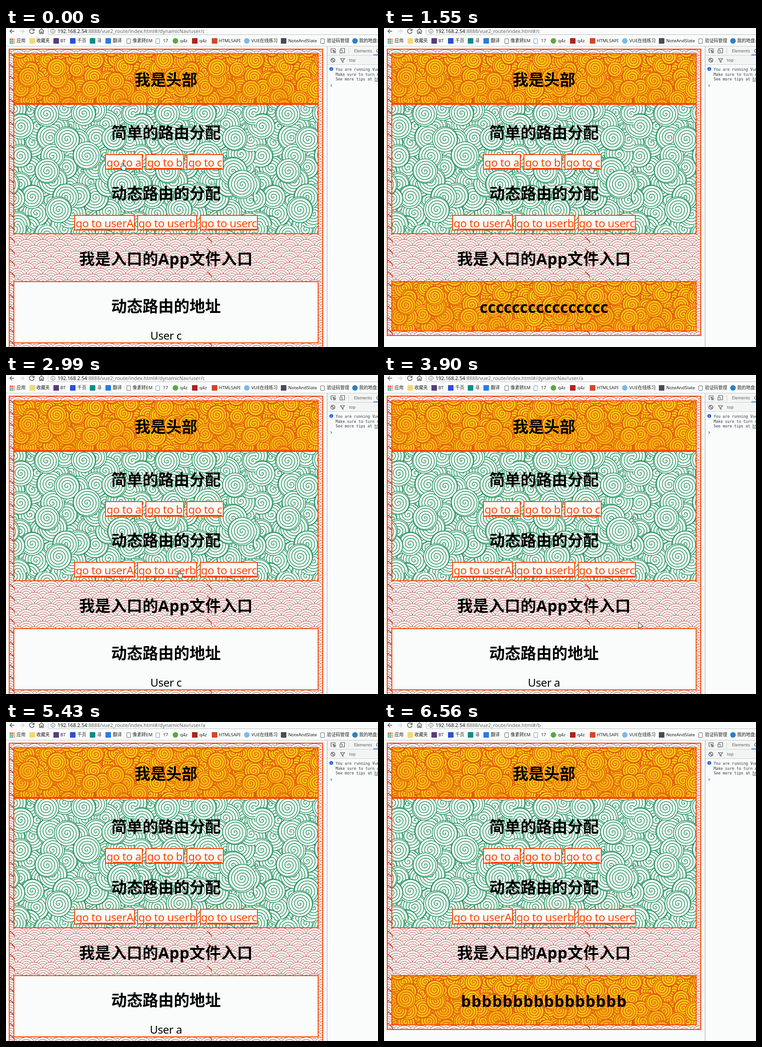
These frames come from a looping animation (808 px wide and 693 px high, 7.15 s). An HTML page with a canvas:

```html
<!DOCTYPE html>
<html lang="zh-CN">
<head>
<meta charset="utf-8">
<title>Vue router demo</title>
<style>
  html, body { margin: 0; width: 100%; height: 100%; overflow: hidden; background: #f9fcfb; }
  #stage { position: relative; width: 808px; height: 693px; overflow: hidden; background: #f9fcfb;
    font-family: "Noto Sans", "Noto Sans CJK SC", "Noto Sans CJK", sans-serif; color: #000; }
  #stage div, #stage span, #stage svg, canvas { position: absolute; box-sizing: border-box; }
  #stage span { white-space: pre; line-height: 20px; }
  .box { border: 2px solid #ff4500; overflow: hidden; }
  .box canvas { left: 0; top: 0; }
  #app { left: 6px; top: 45px; width: 683px; }
  #head { left: 16px; top: 55px; width: 663px; height: 110px; }
  #nav { left: 16px; top: 165px; width: 663px; height: 283px; }
  #view { left: 16px; top: 550px; width: 663px; background: #fafcfc; }
  #stage .title { left: 7px; width: 681px; height: 40px; font: bold 34px/40px "Noto Sans", "Noto Sans CJK SC", "Noto Sans CJK", sans-serif; text-align: center; }
  #user { left: 7px; width: 681px; top: 652px; height: 32px; font-size: 24px; line-height: 32px; letter-spacing: -.4px; text-align: center; }
  .link { border: 2px solid #ff4500; background: #fafcfc; height: 34px; color: #ff4500;
    font-size: 24px; line-height: 31px; letter-spacing: -.4px; text-align: center; white-space: pre;
    text-decoration: underline; text-decoration-thickness: 2px; text-underline-offset: 3px; }
  .mark { font-size: 9.7px; color: #222; top: 18px; }
  #url { left: 112px; top: -3px; font-size: 10.8px; color: #666; }
  #url b { font-weight: normal; color: #111; }
  #tools { left: 697px; top: 40px; width: 111px; height: 653px; border-left: 1px solid #aaa; }
  .bar { left: 0; width: 111px; height: 20px; background: #f3f5f4; border-bottom: 1px solid #d0d2d1; }
  .ui { font-size: 9px; color: #5a5a5a; }
  .log { left: 18px; font: 8.25px/20px "DejaVu Sans Mono", "Noto Sans Mono", monospace; color: #303942; }
</style>
</head>
<body>
<div id="stage">
  <svg width="808" height="40" fill="none" stroke="#5a5a5a" stroke-width="1.5">
    <path d="M18 7H9M13 2.500L8.500 7l4.500 4.500"/>
    <path d="M30 7h9M35 2.500L39.500 7L35 11.500" stroke="#d2d4d3"/>
    <path d="M60.500 4.500A5 5 0 1 0 61 8M61 1.500V5.500H57"/>
    <path d="M71.500 7L77 1.500L82.500 7M73 6.500V12h2.800V8.500h2.400V12H81V6.500"/>
    <path d="M91.500 0V12Q91.500 14.500 94 14.500H808" stroke="#bfc1c0" stroke-width="1"/>
    <circle cx="102" cy="7" r="4.500" stroke-width="1"/><path d="M102 6.300V9.500M102 4.200V5.300" stroke-width="1.200"/>
    <path d="M0 39.500H808" stroke="#c6c8c7" stroke-width="1"/>
  </svg>
  <span id="url"></span>
  <div id="app" class="box"></div>
  <div id="head" class="box"></div>
  <div id="nav" class="box"></div>
  <div id="view" class="box"></div>
  <div class="title" style="top:92px">我是头部</div>
  <div class="title" style="top:207px">简单的路由分配</div>
  <div class="title" style="top:339px">动态路由的分配</div>
  <div class="title" style="top:481px;letter-spacing:.4px">我是入口的App文件入口</div>
  <div class="title" id="page"></div>
  <div id="user"></div>

  <div id="tools">
    <div class="bar" style="top:0"></div>
    <div class="bar" style="top:20px"></div>
    <svg width="111" height="100" fill="none" stroke="#5a5a5a" stroke-width="1.200">
      <path d="M11 13H8V5h9v3M12 8l6 2.500l-2.600 1l-1 2.700zM15.500 11.500l3 3"/>
      <path d="M29 7V4.500h8.500V14H33M27.500 8h4.500v6.500h-4.500z"/>
      <path d="M46.500 4V16" stroke="#ccc" stroke-width="1"/>
      <path d="M100 18.500H111" stroke="#3b79e8" stroke-width="2"/>
      <circle cx="12" cy="30" r="4.300" stroke-width="1.500"/><path d="M9 27l6 6" stroke-width="1.500"/>
      <path d="M28.500 26.500h9l-3.400 4v4l-2.200-1.500v-2.500z"/>
      <circle cx="8.500" cy="49" r="4" fill="#1a56d6" stroke="none"/>
      <path d="M8.500 48.500V51.500M8.500 46.300V47.400" stroke="#fff"/>
      <path d="M7 82.500l2.500 2.500L7 87.500" stroke="#3b79e8"/>
    </svg>
    <span class="ui" style="left:58px;top:0">Elements</span>
    <span class="ui" style="left:106px;top:0;color:#222">Console</span>
    <span class="ui" style="left:47px;top:20px">top</span>
    <span class="log" style="top:40px">You are running Vue in development mode.</span>
    <span class="log" style="top:50.500px">Make sure to turn on production mode.</span>
    <span class="log" style="top:61px">See more tips at <u>https://vuejs.org/guide</u></span>
  </div>

  <svg id="arrow" width="13" height="19" viewBox="-1 -1 13 19"><path d="M0 0V13.500L3.200 10.600L5.300 15.500L7.300 14.600L5.200 9.800H9.500Z" fill="#fff" stroke="#222" stroke-width=".9"/></svg>
  <svg id="hand" width="15" height="19" viewBox="-6 -1 15 19"><path d="M-1.300 1.300Q0-.8 1.300 1.300V6Q2.700 5.200 3.700 6.500Q5.200 5.800 6 7.200Q7.700 7 7.700 9V12L6.300 15V17H-1V15L-4.600 10.500Q-5 8.300-3 8.800L-1.300 10.500ZM1.300 6V9M3.700 6.500V9.500M6 7.200V9.500" fill="#fff" stroke="#222" stroke-width=".9"/></svg>
  <svg id="beam" width="9" height="17" viewBox="-4.500 -8.500 9 17"><path d="M-3-7.500H-1L0-6.500L1-7.500H3M-3 7.500H-1L0 6.500L1 7.500H3M0-6.500V6.500" fill="none" stroke="#333"/></svg>
</div>
<script>
const $ = id => document.getElementById(id);
const stage = $('stage');

function add(cls, style, text = '', tag = 'div') {
  const el = document.createElement(tag);
  el.className = cls;
  el.textContent = text;
  for (const key in style) el.style[key] = typeof style[key] === 'number' ? style[key] + 'px' : style[key];
  stage.insertBefore(el, $('arrow'));
  return el;
}

function seeded(seed) {
  return () => (seed = (seed * 16807) % 2147483647) / 2147483647;
}

function canvas(w, h) {
  const el = document.createElement('canvas');
  el.width = w;
  el.height = h;
  return [el, el.getContext('2d')];
}

// Bookmarks: icon x, text x, label, colour, shape
const bookmarks = [
  [51, 66, '收藏夹', '#f7d774', 'square'],
  [103, 118, 'BT', '#563d7c', 'square'],
  [139, 155, '千页', '#2b4fd8', 'square'],
  [182, 198, '寻', '#0c8c8c', 'square'],
  [216, 232, '翻译', '#2a7de1', 'square'],
  [262, 275, '像素转EM', '', 'doc'],
  [325, 341, '17', '#5b9be0', 'doc'],
  [362, 378, 'q4z', '#5aaa3c', 'circle'],
  [404, 420, 'q4z', '#b3211c', 'square'],
  [447, 462, 'HTML5API', '#d6452b', 'square'],
  [517, 533, 'VUE在线练习', '#7db8ea', 'circle'],
  [597, 613, 'NoteAndSlate', '#4a4a58', 'square'],
  [683, 697, '验证码管理', '', 'doc'],
  [752, 767, '我的地盘:s', '#2f7fc4', 'circle'],
];
for (const [ix, tx, label, color, shape] of bookmarks) {
  const doc = shape === 'doc';
  add('', { left: ix, top: doc ? 23 : 22, width: doc ? 9 : 12, height: doc ? 11 : 12,
    background: doc ? '#fff' : color, border: doc ? '1px solid ' + (color || '#666') : 'none',
    borderRadius: shape === 'circle' ? '50%' : '1px' });
  add('mark', { left: tx }, label, 'span');
}
const appColors = ['#e2402f', '#e2402f', '#f0a020', '#3aa757', '#3a7de0', '#f0a020', '#3aa757', '#3a7de0', '#f0a020'];
appColors.forEach((c, i) =>
  add('', { left: 8 + i % 3 * 4, top: 23 + (i / 3 | 0) * 4, width: 3, height: 3, background: c }));
add('mark', { left: 23 }, '应用', 'span');

// Links: x, width, y, label
const links = [
  [215, 82, 274, 'go to a'], [303, 84, 274, 'go to b'], [392, 81, 274, 'go to c'],
  [148, 132, 406, 'go to userA'], [285, 130, 406, 'go to userb'], [421, 126, 406, 'go to userc'],
];
for (const [left, width, top, label] of links) add('link', { left, width, top }, label);

function spiral(g, x, y, r, gap, turn, paper, ink) {
  g.beginPath();
  g.arc(x, y, r, 0, 7);
  g.fillStyle = paper;
  g.fill();
  g.strokeStyle = ink;
  g.stroke();
  g.beginPath();
  for (let a = 0; a * gap / 6.283 < r; a += .15) {
    const d = a * gap / 6.283;
    g.lineTo(x + d * Math.cos(a + turn), y + d * Math.sin(a + turn));
  }
  g.stroke();
}

function spiralTile(w, h, o) {
  const [tile, g] = canvas(w, h), rnd = seeded(o.seed), spots = [];
  let row = 0;
  for (let y = -o.step / 2; y < h + o.step; y += o.step * .87, row++)
    for (let x = -o.step * (row % 2 ? 1 : .5); x < w + o.step; x += o.step)
      spots.push({ x: x + (rnd() - .5) * o.step * .4, y: y + (rnd() - .5) * o.step * .4, z: rnd() });
  spots.sort((a, b) => a.z - b.z);
  g.fillStyle = o.paper;
  g.fillRect(0, 0, w, h);
  g.lineWidth = o.line;
  for (const s of spots)
    spiral(g, s.x, s.y, o.r * (.9 + rnd() * .25), o.gap, rnd() * 6.28, o.paper, o.ink);
  for (let i = 0; i < (o.shade || 0); i++) {
    const x = i * w / o.shade, y = rnd() * 106, glow = g.createRadialGradient(x, y, 0, x, y, 75);
    glow.addColorStop(0, 'rgba(232,120,8,.36)');
    glow.addColorStop(1, 'rgba(232,120,8,0)');
    g.fillStyle = glow;
    g.fillRect(0, 0, w, h);
  }
  return tile;
}

function waveTile(w, h) {
  const [tile, g] = canvas(w, h);
  const span = 36, step = 12.5;
  for (let row = 0; row * step < h + span; row++)
    for (let x = row % 2 * span / 2 - span; x < w + span; x += span)
      for (const r of [20.5, 15.5, 10.5, 5.5]) {
        g.beginPath();
        g.arc(x, row * step + 8, r, 0, 7);
        g.fillStyle = '#fbfbfa';
        g.fill();
        g.strokeStyle = '#b2463f';
        g.lineWidth = 1;
        g.stroke();
      }
  g.strokeStyle = '#cf2c16';
  g.lineWidth = 1.8;
  for (let y = 12; y < h; y += step * 2) {
    g.beginPath();
    g.arc(-8, y + 14, 20, -1.3, -.3);
    g.stroke();
  }
  return tile;
}

function cover(box, tile, w, h) {
  const [el, g] = canvas(w, h);
  g.fillStyle = g.createPattern(tile, 'repeat');
  g.fillRect(0, 0, w, h);
  box.prepend(el);
  return el;
}

const gold = spiralTile(348, 240, { seed: 71, step: 25, r: 19, gap: 5.4, line: 1.4, paper: '#fdc912', ink: '#d9480c', shade: 3 });
const green = spiralTile(262, 262, { seed: 29, step: 36, r: 27, gap: 6.2, line: 1.55, paper: '#f9fcfa', ink: '#2a9763' });
cover($('app'), waveTile(428, 660), 679, 650);
cover($('head'), gold, 659, 106);
cover($('nav'), green, 659, 279);
const goldView = cover($('view'), gold, 659, 106);

// Each click swaps the routed page at once
const routes = [
  [0, 'user/c'], [350, 'a'], [1030, 'b'], [1550, 'c'], [2520, 'user/c'],
  [3020, 'user/b'], [3680, 'user/a'], [5880, 'b'],
];
const pages = { a: [14, -1], b: [16, 1], c: [16, 0] };
let current;

function show(route) {
  if (route === current) return;
  current = route;
  const isUser = route.startsWith('user');
  $('url').innerHTML = '<b>192.168.2.54</b>:8888/vue2_route/index.html#/' + (isUser ? 'dynamicNav/' : '') + route;
  $('app').style.height = (isUser ? 650 : 624) + 'px';
  $('view').style.height = (isUser ? 135 : 109) + 'px';
  goldView.style.display = isUser ? 'none' : 'block';
  const [count, spacing] = pages[route] || [0, 0];
  $('page').textContent = isUser ? '动态路由的地址' : route.repeat(count);
  $('page').style.top = isUser ? '584px' : '585.5px';
  $('page').style.letterSpacing = spacing + 'px';
  $('user').textContent = isUser ? 'User ' + route.slice(-1) : '';
}

// Pointer path: time, x, y; hidden between the two visits
const path = [
  [0, 253, 292], [350, 253, 292], [430, 256, 290], [800, 345, 293], [1030, 345, 293],
  [1250, 447, 298], [1520, 447, 298], [1550, 449, 298], [2220, 462, 421], [2280, 463, 420],
  [2520, 463, 420], [2780, 375, 425], [2960, 375, 425], [2990, 376, 424], [3470, 242, 424],
  [3680, 242, 424], [3900, 552, 537], [4300, 763, 694], [4930, 763, 694], [4950, 737, 660],
  [5200, 580, 560], [5430, 346, 316], [5510, 351, 311], [5640, 351, 311], [5740, 355, 299],
  [5880, 355, 299], [6230, 793, 680], [6490, 793, 680], [6560, 808, 694], [7150, 808, 694],
];
const titles = [[279, 95, 415, 130], [228, 207, 466, 247], [228, 339, 466, 379], [159, 481, 535, 521]];

function pointer(t) {
  const i = path.findIndex(p => p[0] > t);
  const [t0, x0, y0] = path[i - 1], [t1, x1, y1] = path[i];
  const k = (t - t0) / (t1 - t0);
  const x = Math.round(x0 + (x1 - x0) * k), y = Math.round(y0 + (y1 - y0) * k);
  const onLink = links.some(([l, w, top]) => x >= l && x < l + w && y >= top && y < top + 34);
  const onText = titles.some(([l, top, r, b]) => x > l && x < r && y > top && y < b);
  const kind = onLink ? 'hand' : onText ? 'beam' : 'arrow';
  const hidden = y >= 693 || t >= 6550;
  const offset = { arrow: [1, 1], hand: [6, 1], beam: [4, 8] }[kind];
  for (const id of ['arrow', 'hand', 'beam']) $(id).style.display = id === kind && !hidden ? 'block' : 'none';
  $(kind).style.left = x - offset[0] + 'px';
  $(kind).style.top = y - offset[1] + 'px';
}

const start = performance.now();
function frame() {
  const t = (performance.now() - start) % 7150;
  show(routes.filter(r => r[0] <= t).pop()[1]);
  pointer(t);
  requestAnimationFrame(frame);
}
frame();
</script>
</body>
</html>
```
